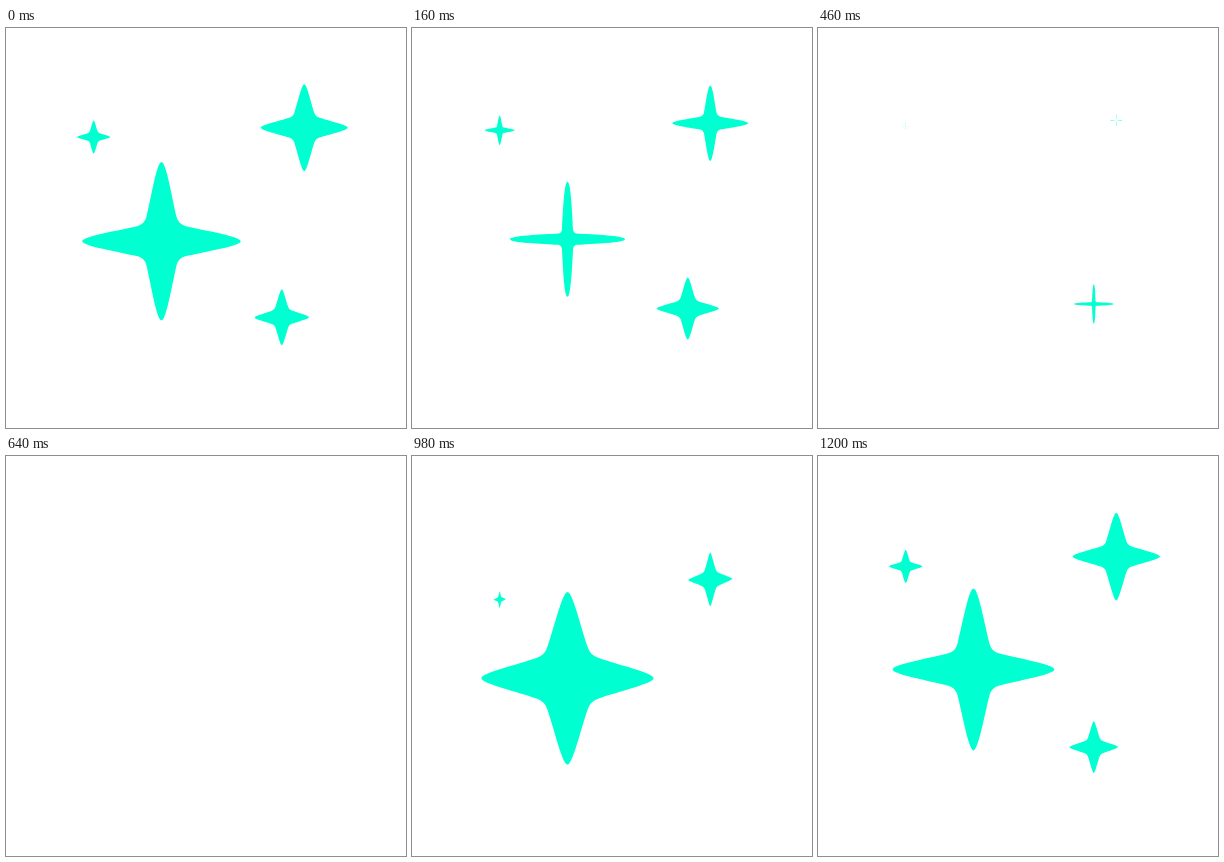
Write an HTML page with a canvas that moves like this. It is 400 px wide and 400 px high and loops after 1.22 s.

```html
<!DOCTYPE html>
<html lang="en">
<head>
<meta charset="utf-8">
<title>Sparkles</title>
<style>
  html, body { margin: 0; width: 100%; height: 100%; overflow: hidden; background: #fff; }
  canvas { display: block; width: 400px; height: 400px; }
</style>
</head>
<body>
<canvas id="stage" width="400" height="400"></canvas>
<script>
const ctx = document.getElementById('stage').getContext('2d');
const LOOP = 1220, STEP = 20, BIRTH = 780, LIFE = 795;

// x, resting y, full radius, climb in px, delay in ms
const STARS = [
  { x: 155.5, y: 210,  r: 87,   climb: 34, delay: 0 },
  { x: 298.3, y: 92,   r: 44,   climb: 44, delay: 115 },
  { x: 87.7,  y: 97.6, r: 16.7, climb: 57, delay: 140 },
  { x: 275.8, y: 275,  r: 31.4, climb: 30, delay: 285 }
];

const clamp = v => Math.min(1, Math.max(0, v));
const smooth = u => u * u * (3 - 2 * u);

// All proportions of a star at age t, in px
function pose({ r, climb }, t) {
  const rise = smooth(clamp((t + 45) / 260));
  const fade = 1 - clamp((t - 240) / 580) ** 2.27;
  const w = r * rise * fade;
  return {
    w,
    h: w + r * .22 * (1 - rise),
    waist: r * .278 * rise ** .8 * fade ** 3.1,
    tip: r * .06 * rise ** 1.3 * fade,
    drop: climb * fade / (1 + ((t + 45) / 192) ** 2.35),
    tilt: r * .03 * (1 - rise)
  };
}

// Control points of half an arm, as [across, along] pairs from tip to waist
function halfArm(length, tip, across, along) {
  const a = .84 * across, b = 1.3 * along;
  return [
    [0, length],
    [tip, length],
    [tip + .55 * (a - tip), b + .35 * (length - b)],
    [a, b]
  ];
}

function drawStar(star, t) {
  if (t < -10 || t >= LIFE) return;
  const { w, h, waist, tip, drop, tilt } = pose(star, t);
  const kx = 2 * w / (w + h), ky = 2 * h / (w + h);
  const cx = waist * kx, cy = waist * ky;
  const tall = halfArm(h, tip * kx, cx, cy);
  const wide = halfArm(w, tip * ky, cy, cx).map(([p, q]) => [q, p]);

  ctx.save();
  ctx.translate(star.x, star.y + drop);
  ctx.transform(1, -tilt / w, 0, 1, 0, 0);
  ctx.beginPath();
  ctx.moveTo(0, -h);
  // Clockwise quarters, each from one tip round the waist to the next
  for (const [sx, sy] of [[1, -1], [1, 1], [-1, 1], [-1, -1]]) {
    const at = ([x, y]) => [sx * x, sy * y];
    const [from, to] = sx * sy < 0 ? [tall, wide] : [wide, tall];
    ctx.bezierCurveTo(...at(from[1]), ...at(from[2]), ...at(from[3]));
    ctx.quadraticCurveTo(...at([.95 * cx, .95 * cy]), ...at(to[3]));
    ctx.bezierCurveTo(...at(to[2]), ...at(to[1]), ...at(to[0]));
  }
  ctx.fill();
  ctx.restore();
}

function draw(ms) {
  const t = Math.floor((ms % LOOP) / STEP) * STEP;
  const age = (t - BIRTH + LOOP) % LOOP;
  ctx.fillStyle = '#fff';
  ctx.fillRect(0, 0, 400, 400);
  ctx.fillStyle = '#00ffd1';
  for (const star of STARS) drawStar(star, age - star.delay);
}

const start = performance.now();
function tick() {
  draw(performance.now() - start);
  requestAnimationFrame(tick);
}
tick();
</script>
</body>
</html>
```
